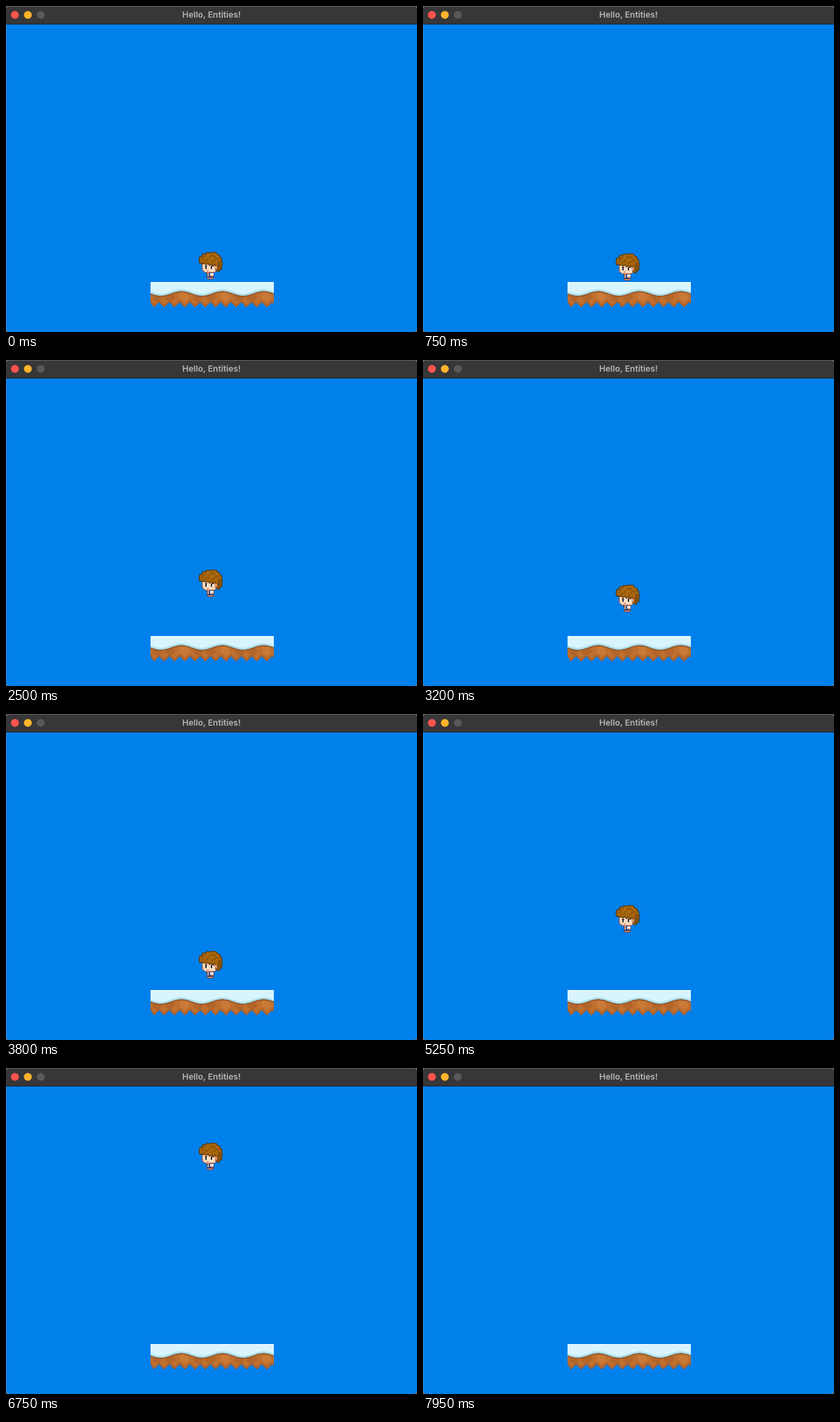
Write an HTML page with a canvas that moves like this. It is 600 by 476 pixels and loops after 8000 ms.

```html
<!DOCTYPE html>
<html lang="en">
<head>
<meta charset="utf-8">
<title>Hello, Entities!</title>
<style>
  html, body { margin: 0; width: 100%; height: 100%; overflow: hidden; background: #777; }
  canvas { display: block; width: 600px; height: 476px; border-radius: 5px; }
</style>
</head>
<body>
<canvas id="stage" width="600" height="476"></canvas>
<script>
const ctx = document.getElementById('stage').getContext('2d');
const LOOP = 8000, STEP = 50;

// [time in ms, top of the hair]
const heights = [
  [0, 359], [200, 361], [1650, 361], [2500, 306],
  [3800, 346], [5250, 279], [6150, 186], [7700, -20], [8000, -60]
];

function rect(x, y, w, h, color) {
  ctx.fillStyle = color;
  ctx.fillRect(x, y, w, h);
}

function shape(path, fill, stroke, width = 1) {
  const p = new Path2D(path);
  if (fill) { ctx.fillStyle = fill; ctx.fill(p); }
  if (stroke) { ctx.strokeStyle = stroke; ctx.lineWidth = width; ctx.stroke(p); }
}

// Monotone cubic: flat at turning points, smooth elsewhere
function tangent(i) {
  const a = heights[i - 1], b = heights[i], c = heights[i + 1];
  if (!a || !c || (b[1] - a[1]) * (c[1] - b[1]) <= 0) return 0;
  return (c[1] - a[1]) / (c[0] - a[0]);
}

function heightAt(t) {
  let i = 0;
  while (i < heights.length - 2 && t >= heights[i + 1][0]) i++;
  const [t0, y0] = heights[i], [t1, y1] = heights[i + 1];
  const d = t1 - t0, u = (t - t0) / d, v = 1 - u;
  return y0 * v * v * (1 + 2 * u) + y1 * u * u * (3 - 2 * u)
    + d * u * v * (v * tangent(i) - u * tangent(i + 1));
}

function drawTitleBar() {
  rect(0, 0, 600, 27, '#373638');
  rect(0, 0, 600, 1, '#626164');
  rect(0, 26, 600, 1, '#1d2733');
  ['#fe544d', '#ffb429', '#59585b'].forEach((color, i) => {
    ctx.fillStyle = color;
    ctx.beginPath();
    ctx.arc(13 + 18.9 * i, 13, 5.8, 0, 2 * Math.PI);
    ctx.fill();
  });
  ctx.fillStyle = '#b7b6b8';
  ctx.font = '600 12.3px Inter, sans-serif';
  ctx.textAlign = 'center';
  ctx.fillText('Hello, Entities!', 300, 17);
}

// Snow edge, repeating once per 60 px tile
const snowEdge = x => 419.3 - 3.3 * Math.cos((x - 256) * Math.PI / 30);

function wave(offset) {
  let path = '';
  for (let x = 211; x <= 391; x += 2) path += `L${x} ${snowEdge(x) + offset}`;
  return path;
}

function drawPlatform() {
  let teeth = 'L391 435L388.5 432.5';
  for (let x = 381; x >= 216; x -= 15) teeth += `L${x} 440L${Math.max(211, x - 7.5)} 432.5`;
  const earth = 'M211 419' + wave(0) + teeth + 'Z';

  ctx.save();
  ctx.clip(new Path2D(earth));
  rect(211, 410, 180, 31, '#bf6f2e');
  for (let x = 211; x < 391; x += 60) {
    shape(`M${x + 3} 423l8 -2 6 5 -5 6 -8 -2Z`, '#b3652a');
    shape(`M${x + 22} 419l10 -1 4 8 -6 6 -9 -4Z`, '#b3652a');
    shape(`M${x + 43} 419l11 0 3 8 -7 5 -8 -5Z`, '#c97a37');
  }
  shape('M211 433' + teeth.split('L').slice(1).reverse().map(p => 'L' + p).join(''),
    null, '#a66032', 4);
  shape('M211 419' + wave(1), null, '#93562d', 2);
  ctx.restore();

  shape('M211 403' + wave(0) + 'L391 403Z', '#d8f4fd');
  shape(`M211 ${snowEdge(211) - 1}` + wave(-1), null, '#a9dfe9', 2.4);
  rect(211, 403, 180, 2, '#e6f8fe');
}

function drawHero(y) {
  ctx.save();
  ctx.beginPath();
  ctx.rect(0, 27, 600, 449);
  ctx.clip();
  ctx.translate(281, Math.round(y));
  ctx.lineJoin = 'round';

  // Body and feet
  shape('M12 28H22V37H13Z', '#294b91', '#252b4c');
  rect(13, 30, 2, 6, '#e9a98a');
  rect(17, 31, 5, 4, '#f4e7e1');
  rect(18, 34, 4, 2, '#d99a86');
  shape('M12.5 37.5H21.5V39.5H13.5Z', '#efad91', '#713f45');

  // Head
  shape('M5 15H28V26L23 30H10L6 27Z', '#fbdcc0', '#a64a2c');
  rect(6, 24, 2, 3, '#f3b59a');
  rect(9, 20, 4, 1, '#50301f');
  rect(10, 21, 2, 4, '#2c2225');
  rect(12, 21, 1, 3, '#ffffff');
  rect(18, 20, 4, 1, '#50301f');
  rect(18, 21, 2, 4, '#2c2225');
  rect(20, 21, 1, 3, '#ffffff');
  rect(12, 27, 3, 1, '#bd5e48');

  // Hair
  shape('M1 11L2 7 5 7 6 3 10 3 12 1 16 1.5 20 .5 26 1 28 4 31 5 32 8 34 10 34 14 35 17 34 21 34 25 31 26 30 29 27 28 25 26 26 21 24 18 22 21 19 18 16 20 14 17 11 19 9 17 6 18 4 16 2 17 1 14Z',
    '#a7650d', '#553309', 1.2);
  shape('M29 13L33 14 33 24 29 27 27 26 28 20Z', '#82500d');
  shape('M5 12l3 -5 4 -2M12 13l3 -4M16 7l5 -2 4 3M23 13l3 -4 4 2M7 16l4 -4M19 16l3 -4M29 17l3 3',
    null, '#744409', 1);
  shape('M9 9l3 -3 3 0M17 11l3 -2M26 6l2 2', null, '#bd7d1d', 1);
  shape('M24 20l3 1 0 4 -2 1Z', '#f6c29d', '#a64a2c', .7);
  ctx.restore();
}

function frame(now) {
  const t = Math.floor((now % LOOP) / STEP) * STEP;
  rect(0, 0, 600, 476, '#0080eb');
  rect(0, 27, 1, 449, '#2a8de5');
  drawTitleBar();
  drawPlatform();
  drawHero(heightAt(t));
  requestAnimationFrame(frame);
}

requestAnimationFrame(frame);
</script>
</body>
</html>
```
